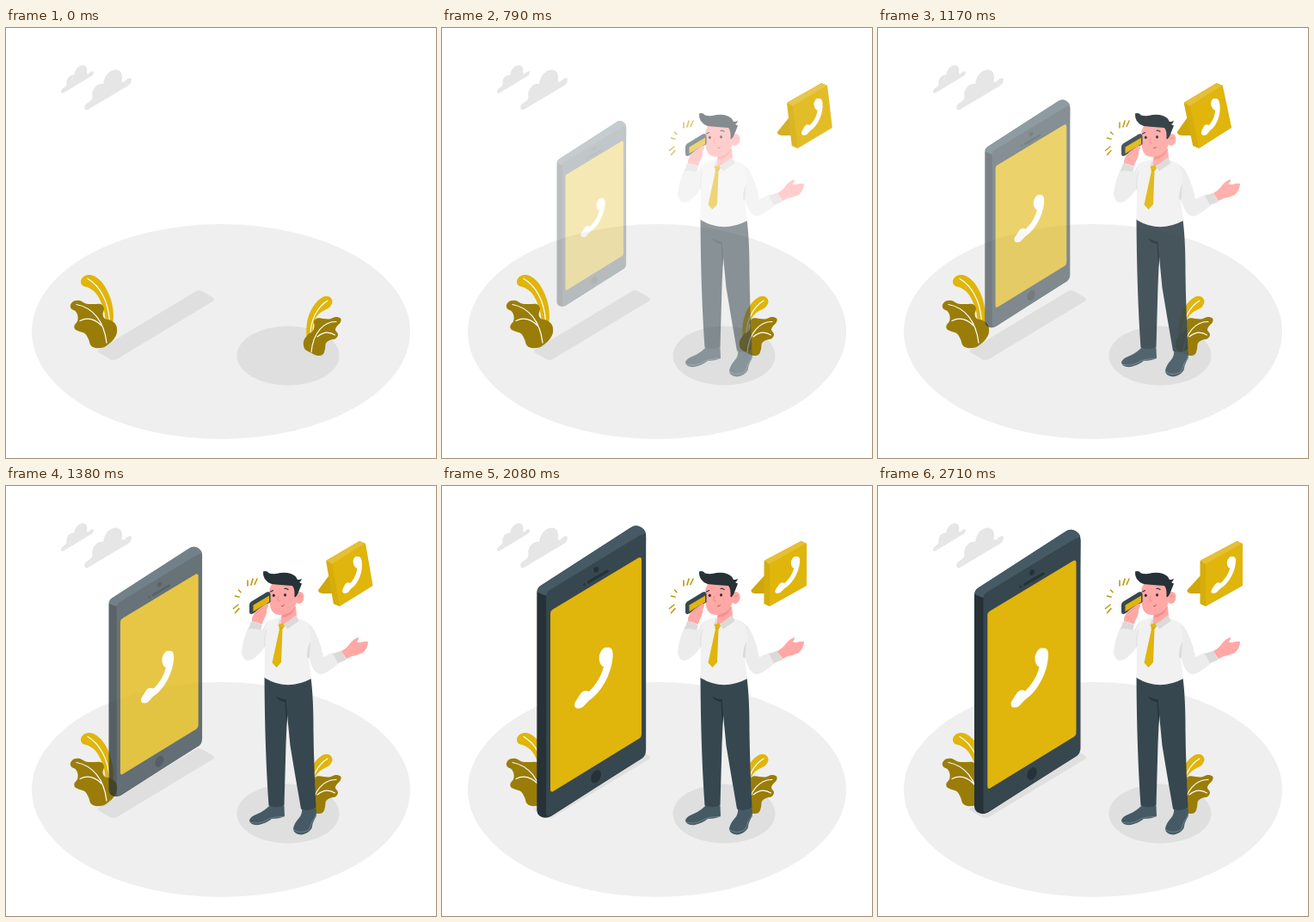
An HTML page with a canvas for the animation above (2750 ms loop, 500 by 500 pixels).

```html
<!DOCTYPE html>
<html lang="en">
<head>
<meta charset="utf-8">
<title>Phone call</title>
<style>
html, body { margin: 0; width: 100%; height: 100%; overflow: hidden; background: #fff; }
canvas { display: block; width: 100vw; height: 100vh; }
</style>
</head>
<body>
<canvas id="stage" width="500" height="500"></canvas>
<script>
const SIZE = 500, LOOP = 2750, FPS = 24, LAST_STEP = 65;
const GOLD = '#e0b50c', DARK_GOLD = '#9a7d08', SLATE = '#37474f', INK = '#263238', STEEL = '#455a64';
const SKIN = '#ffa8a5', BLUSH = '#f58f8d', SHIRT = '#f1f1f1', SLEEVE = '#ececec', CUFF = '#dadada', SHADOW = '#dfdfdf';

const stage = document.getElementById('stage').getContext('2d');
const layer = document.createElement('canvas');
layer.width = layer.height = SIZE;
const layerCtx = layer.getContext('2d');
let ctx = stage;

function fill(color, d) {
  ctx.fillStyle = color;
  ctx.fill(new Path2D(d));
}

function line(color, width, d) {
  ctx.strokeStyle = color;
  ctx.lineWidth = width;
  ctx.lineCap = ctx.lineJoin = 'round';
  ctx.stroke(new Path2D(d));
}

function oval(color, x, y, rx, ry = rx, angle = 0) {
  ctx.fillStyle = color;
  ctx.beginPath();
  ctx.ellipse(x, y, rx, ry, angle, 0, Math.PI * 2);
  ctx.fill();
}

// Fills a closed smooth curve through "x y, x y, ..." points.
function blob(color, text) {
  const pts = text.split(',').map(pair => pair.trim().split(' ').map(Number));
  const at = i => pts[(i + pts.length) % pts.length];
  ctx.fillStyle = color;
  ctx.beginPath();
  ctx.moveTo(...pts[0]);
  pts.forEach(([x, y], i) => {
    const before = at(i - 1), next = at(i + 1), after = at(i + 2);
    ctx.bezierCurveTo(x + (next[0] - before[0]) / 6, y + (next[1] - before[1]) / 6,
      next[0] - (after[0] - x) / 6, next[1] - (after[1] - y) / 6, ...next);
  });
  ctx.fill();
}

// Draws a group with one shared opacity.
function group(alpha, draw) {
  ctx = layerCtx;
  ctx.setTransform(1, 0, 0, 1, 0, 0);
  ctx.clearRect(0, 0, SIZE, SIZE);
  draw();
  ctx = stage;
  ctx.globalAlpha = Math.min(1, Math.max(0, alpha));
  ctx.drawImage(layer, 0, 0);
  ctx.globalAlpha = 1;
}

// Cubic bezier easing (.36, -.01, .5, 1.38), slightly overshooting.
function ease(x) {
  if (x <= 0) return 0;
  if (x >= 1) return 1;
  const curve = (a, b, u) => 3 * a * u * (1 - u) ** 2 + 3 * b * u * u * (1 - u) + u ** 3;
  let lo = 0, hi = 1;
  for (let i = 0; i < 24; i++) {
    const mid = (lo + hi) / 2;
    if (curve(.36, .5, mid) < x) lo = mid; else hi = mid;
  }
  return curve(-.01, 1.38, lo);
}

function cloud() {
  fill('#e6e6e6', `M91.5 94Q90 90 95 87Q100 84 100.5 81Q99 73 105 67Q109 64 113 65Q114 55 122 50Q130 46 134 52
    Q136 57 134.5 62Q137 64 139 61Q143 57 146 59Q146 65 142 67L95 95Q92 96 91.5 94Z`);
}

function handset() {
  fill('#fff', `M182.5 198Q185 190 189 188.5L194 188.5Q198 189.5 198 196C198 215 186 239 171 248.5L164 256Q160 258.5 156 257
    Q153.5 254 155.5 250L162 240Q166 235.5 171 238.5C179 231 185 221 187.5 210.5Q182 208 182.5 198Z`);
}

function scenery() {
  oval('#efefef', 250, 353, 220, 125);
  fill(SHADOW, 'M108 374L221 306Q224 304 228 306L240 313Q244 316 240 318L129 385Q125 387 121 385L109 378Q105 376 108 374Z');
  oval(SHADOW, 328, 381, 59.5, 34.5);
  cloud();
  ctx.save();
  ctx.translate(64, 43);
  ctx.scale(.69, .69);
  ctx.translate(-91, -48);
  cloud();
  ctx.restore();

  blob(GOLD, '87 294, 91 288.5, 98 287, 106 290.5, 114 299, 121 313, 124.5 328, 124 343, 117 343, 113 325, 105 309, 96 302, 89 299.5');
  line('#fff', 1.2, 'M95 291.5C108 299 119 316 120.5 341');
  blob(DARK_GOLD, `75 322, 79 317.5, 86 317, 93 320.5, 101 321, 110 321, 114 326, 112.5 333, 115 338, 122 340, 128 345.5, 129 354,
    125.5 361.5, 120 367, 113 371.5, 104 372, 98.5 369, 96 362, 92 355.5, 86 353, 80.5 350.5, 79.5 346, 83 341, 83.5 335, 81 329.5, 76 326.5`);
  line('#fff', 1.2, 'M82 321.5C101 325 114 341 117 366M86 340.5Q99 334 111 346');

  blob(GOLD, '379.5 318, 376 312.5, 369 312.5, 360 320, 352.5 333, 349.5 347, 350 359, 356 358, 357 346, 361 336, 367 330, 376 325');
  line('#fff', 1.1, 'M374 317C362 324 354 340 354 357');
  blob(DARK_GOLD, `346.5 363, 351 356.5, 357 352, 358.5 346, 358 341, 362 337.5, 369 338, 376 338.5, 383 336, 389 337.5, 389 342,
    385 346.5, 383 351, 386 356, 383.5 361, 376.5 363, 372 366.5, 371 373, 368.5 379.5, 362 381, 355 378, 348 374, 346 369`);
  line('#fff', 1.1, 'M384 341.5C370 341 357 354 355 377M382.5 357Q372 350.5 362 359');
}

function bigPhone(scale) {
  ctx.translate(174, 216);
  ctx.scale(scale, scale);
  ctx.translate(-174, -216);
  fill(INK, `M112 127Q112 121 116.5 118.5L218 53Q224 49 230 52.500Q235.500 56 235.500 62L232 313L128 379.500
    Q121 383 115 379Q112 376.500 112 373Z`);
  fill(STEEL, 'M112.600 126Q113 121 116.500 118.500L218 53Q224 49 230 52.500Q234.500 55 235.200 59.500L126 127L122.500 130Z');
  fill(SLATE, `M122.500 131Q122.500 126 126.500 123.500L228 62Q235.500 57.500 235.500 64L235.500 304Q235.500 311 231 314
    L128 378.500Q122.500 381.500 122.500 375Z`);
  fill(GOLD, `M127.300 150.500Q127.300 147 130 145.500L227 87Q230.500 85.500 230.500 89.500L230.500 286Q230.500 290 228 291.500
    L131 351Q127.300 353.500 127.300 349Z`);
  line(INK, 3, 'M170.5 114.5L192 102');
  oval(INK, 179, 100.5, 2.7, 3.4, .5);
  oval(INK, 165.8, 117.2, 1.2, 1.6, .5);
  oval(INK, 179, 334.5, 5.2, 7.8, .45);
  handset();
}

function badge(shift, skew) {
  const slope = Math.tan(skew * Math.PI / 180);
  ctx.transform(1, 0, slope, 1, shift - 101 * slope, 0);
  fill('#d0a70b', 'M376 103L359.500 121Q359 124.500 364 125L376 125Z');
  fill('#d6ad0b', 'M374.500 88Q374.500 87 376 86L417.500 64L424 67L381 140L374.500 137Z');
  fill('#e5bf35', 'M375 87L417.500 64L424 67L381 91Z');
  fill(GOLD, 'M381 90.500L423 67Q424 67 424 68L424 115Q424 116 423 116.500L381 140Z');
  ctx.translate(387, 82);
  ctx.scale(.66, .62);
  ctx.translate(-154, -188.5);
  handset();
}

function legs() {
  fill(STEEL, `M308 370L323.500 372L324 384Q318 387 309 387Q303 392 294 394Q284 395 283 389Q284 384 293 381Q302 377 308 370Z`);
  fill(STEEL, `M344 374L360.500 375Q362 384 359 387Q356 392 355.500 398Q351 405 343 405.500Q334 405 334 398
    Q336 391 340 387Q345 382 344 374Z`);
  line('#8f9ba1', .6, 'M284 391Q294 394 303 388.500Q309 384.500 323 384.500M335 400Q342 405 352 400Q355 394 356 390Q360 385 361 381');
  fill(SLATE, `M300.500 222Q327 233 354.500 223Q357.500 245 357.500 285Q358 325 360.500 374Q352 379 343 375.500
    L336 335L330.500 302L327 266L325.500 300L323.500 371.500Q314 375 305.500 371.500Q301 310 300.500 222Z`);
  fill(INK, 'M314 244.500Q320 248 325.500 248.500L327 268L326 278L324.500 251Q317 250 314 244.500Z');
}

function torso() {
  fill(SLEEVE, 'M303 158L297.5 167L282 164Q275 180 274 193Q275 203 282 203Q290 202 301 187L306 165Z');
  fill(SLEEVE, 'M347 157Q356 161 360 171Q366 183 369 199L381 193.500L387 206Q376 216 367 219Q360 219 356 210L350 194Z');
  fill(SHIRT, `M318 153Q308 155 303 158Q300 172 301 187L300.500 223Q327 239 355 224L351.500 196L355 178
    Q354 160 347 157L336 152Z`);
  fill(CUFF, 'M350 199Q350 188 354 181Q353 190 352.500 200Z');
  line(CUFF, .8, 'M303 167Q300 175 301 187');
  fill(CUFF, 'M285 157.500Q291 157.500 298 162L296 167.500Q289 165 282 166.500Z');
  fill(CUFF, 'M380 195L390 191.500L396 202L386 206Z');
  fill(SKIN, `M390 192Q397 188 400 183Q404 178 409.500 176Q411 178 407.500 181.500L412 182Q418 180 421 181
    Q421 188 415 194Q408 197 402 198L396 201Z`);
  fill(SKIN, 'M321 145L337 140L338 152Q328 160 319 161Z');
  fill(BLUSH, 'M321 150Q331 148 337 140Q333 152 321 153Z');
  fill(CUFF, 'M337 150.500L340.500 157L327 166.500L323 161Z');
  fill(CUFF, 'M319 154L316 161L320 160Z');
  fill(GOLD, 'M316.500 161L322.500 159.500L324 163L321.500 166.500L320 205L314.500 211L309.500 205.500L318 166Z');
  line('#c9a20a', .7, 'M318 165.500L321.500 165.500');
}

function head() {
  oval(SKIN, 341.5, 130, 5, 7, .2);
  fill(SKIN, 'M306.500 119Q305 138 309 145Q314 152 324 149Q335 146 338 135L338 113L310 112Z');
  fill(INK, `M299 99.500Q303 98 306 101.500Q313 103 319 101Q331 99.500 337 105.500L339 109Q342 109.500 343.500 107.500
    Q344 110 341 112L344 113.500Q341 121 339.500 125Q337 130 335.500 129Q336 119 333 116Q318 115 309 114Q298 110 299 99.500Z`);
  line('#f07f80', .9, 'M317 128Q314 134 318 134M340 129Q342 126 344 128');
  line(INK, 1.1, 'M307.5 123L310.5 121.5M324 119.5Q326 118.5 328 120.5');
  line('#b04b4d', .9, 'M320.500 139.500Q322 140.500 323.500 138.500');
  oval(INK, 311.3, 127.2, 1.5, 1.8);
  oval(INK, 324.5, 126.8, 1.5, 1.8);
}

function handPhone() {
  fill(SLATE, 'M283 138Q283 136 285 134.500L303 123.500Q307 122 307.500 126L307.500 135L287 148.500Q283 150 283 146Z');
  fill(GOLD, 'M287.500 138.500L306 127.500L306 135L287.500 146Z');
  fill(SKIN, 'M286 154Q288 147 293 143.500L303 136.500Q307 138 303 143.500Q304 148 299.500 156L297.500 161Q291 157.500 286 157.500Z');
  line(BLUSH, .7, 'M291 148L298 142');
  line('#bd980b', 1.6, `M281 110L281 116M287 108L285 115M292 108L289 114.500M266.500 128L271 129M270.500 121L273 123.500
    M264.500 142.500L270 138M266.500 147.500L271 142.500`);
}

function man() {
  legs();
  torso();
  head();
  handPhone();
}

// Slides in leaning, swings past upright, then settles.
function badgePose(p) {
  if (p < .6) {
    const e = ease(p / .6);
    return { shift: 250 * (1 - e), skew: -20 + 30 * e, alpha: e };
  }
  if (p < .8) return { shift: 0, skew: 10 - 12 * ease((p - .6) / .2), alpha: 1 };
  return { shift: 0, skew: -2 + 2 * ease((p - .8) / .2), alpha: 1 };
}

function render(ms) {
  const step = Math.min(LAST_STEP, Math.floor(ms * FPS / 1000 + .13));
  const p = step / LAST_STEP;
  stage.fillStyle = '#fff';
  stage.fillRect(0, 0, SIZE, SIZE);
  scenery();
  const grow = ease(p);
  group(grow, () => bigPhone(.5 + grow / 2));
  group(ease(p * 1.4), man);
  const pose = badgePose(p * 1.2);
  group(pose.alpha, () => badge(pose.shift, pose.skew));
}

const start = performance.now();
function tick() {
  render((performance.now() - start) % LOOP);
  requestAnimationFrame(tick);
}
tick();
</script>
</body>
</html>
```
